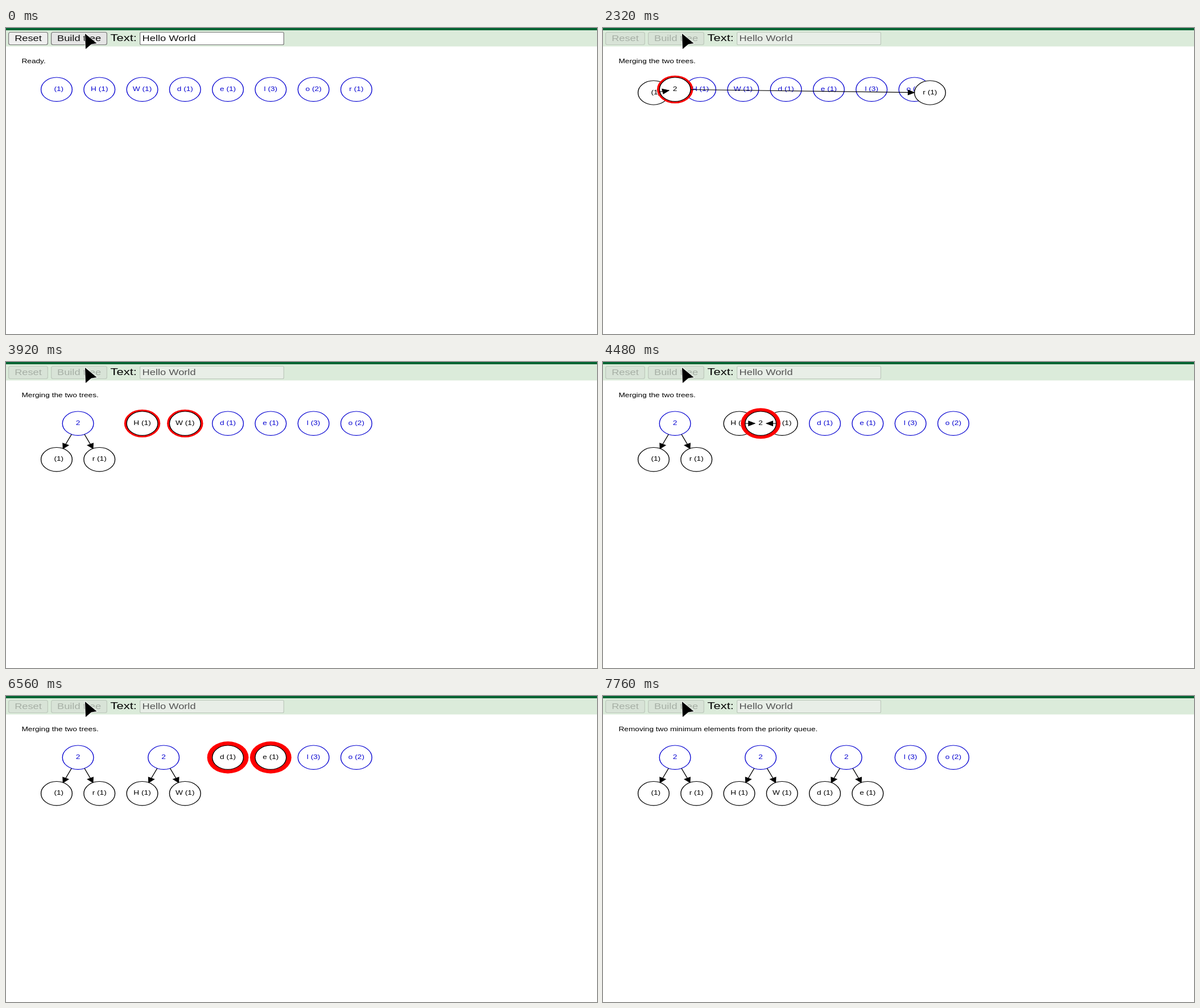
These frames come from a looping animation (1039 px wide and 539 px high, 8000 ms). An HTML page with a canvas:

```html
<!DOCTYPE html>
<html lang="en">
<head>
<meta charset="utf-8">
<title>Building a Huffman tree</title>
<style>
  html, body { margin: 0; width: 100%; height: 100%; overflow: hidden; background: #fff; }
  canvas { display: block; }
</style>
</head>
<body>
<canvas id="stage" width="1039" height="539"></canvas>
<script>
const ctx = document.getElementById("stage").getContext("2d");
const LOOP = 8000;
const SX = 1.3687, SY = 1.058;          // the whole page is shown wider than tall
const FONT = '"Liberation Sans", Arial, sans-serif';
const BLUE = "#0b08d2", BLACK = "#000", RED = "#f00";
const RADIUS = 20, SLOT = 55, FIRST_X = 65, ROOT_Y = 102.3, LEVEL = 60;

const labels = ["  (1)", "H (1)", "W (1)", "d (1)", "e (1)", "l (3)", "o (2)", "r (1)"];
const pairs = [[0, 7], [1, 2], [3, 4]];

// Each merge cycle runs through the same stages, in ms after its start.
const DISABLED_AT = 800;
const starts = [1175, 3358, 5515, 7690];
const MERGE = 363, MOVE = 1095, REINSERT = 1458, TICK = 33, TICKS = 11;

const clamp = (v, lo, hi) => Math.max(lo, Math.min(hi, v));
const mix = (a, b, p) => a + (b - a) * p;
const slotX = slot => FIRST_X + SLOT * slot;

function moveProgress(age) {
  return clamp(Math.floor((age - MOVE) / TICK) / TICKS, 0, 1);
}

// Highlight rings swell and shrink between 3 and 7 units.
function ringWidth(t) {
  const phase = ((t - 2280) / 1680 % 1 + 1) % 1;
  return 3 + 4 * (1 - Math.abs(1 - 2 * phase));
}

function message(t) {
  const age = t - (starts.filter(s => s <= t).pop() ?? Infinity);
  if (age < 0) return "Ready.";
  if (age < MERGE) return "Removing two minimum elements from the priority queue.";
  if (age < REINSERT) return "Merging the two trees.";
  return "Reinserting the new root node in the priority queue.";
}

function write(str, x, y, size, color, align = "left", baseline = "alphabetic") {
  ctx.font = `${size}px ${FONT}`;
  ctx.fillStyle = color;
  ctx.textAlign = align;
  ctx.textBaseline = baseline;
  ctx.fillText(str, x, y);
}

// Places text by stage pixels.
function writeAt(str, px, py, size, color, align) {
  write(str, px / SX, py / SY, size, color, align);
}

function box(x, y, w, h, fill, stroke, radius = 3) {
  ctx.beginPath();
  ctx.roundRect(x + 0.6, y + 0.5, w - 1.2, h - 1, radius);
  ctx.fillStyle = fill;
  ctx.fill();
  ctx.strokeStyle = stroke;
  ctx.lineWidth = 1.2;
  ctx.stroke();
}

function disc(x, y, r) {
  ctx.beginPath();
  ctx.arc(x, y, r, 0, 2 * Math.PI);
}

function drawNode(node, ring) {
  if (node.lit) {
    disc(node.x, node.y, RADIUS + ring);
    ctx.fillStyle = RED;
    ctx.fill();
  }
  disc(node.x, node.y, RADIUS);
  ctx.fillStyle = "#fff";
  ctx.fill();
  ctx.strokeStyle = node.color;
  ctx.lineWidth = 1;
  ctx.stroke();
  write(node.label, node.x, node.y - 0.3, 10, node.color, "center", "middle");
}

function drawEdge(from, to) {
  const dx = to.x - from.x, dy = to.y - from.y, len = Math.hypot(dx, dy);
  const ux = dx / len * RADIUS, uy = dy / len * RADIUS;
  const x1 = from.x + ux, y1 = from.y + uy, x2 = to.x - ux, y2 = to.y - uy;
  ctx.strokeStyle = ctx.fillStyle = BLACK;
  ctx.lineWidth = 1;
  ctx.beginPath();
  ctx.moveTo(x1, y1);
  ctx.lineTo(x2, y2);
  ctx.stroke();
  ctx.save();
  ctx.translate(x2, y2);
  ctx.rotate(Math.atan2(y2 - y1, x2 - x1));
  ctx.beginPath();
  ctx.moveTo(0, 0);
  ctx.lineTo(-8, -4);
  ctx.lineTo(-8, 4);
  ctx.closePath();
  ctx.fill();
  ctx.stroke();
  ctx.restore();
}

function drawTree(t) {
  const shift = moveProgress(t - starts[0]);
  const nodes = labels.map((label, i) => {
    const target = i === 0 ? 0 : i === 7 ? 1 : i + 1;
    return { label, x: slotX(mix(i, target, shift)), y: ROOT_Y, color: BLUE };
  });
  const parents = [], edges = [];
  pairs.forEach((pair, k) => {
    const age = t - starts[k];
    if (age < MERGE) return;
    const children = pair.map(i => nodes[i]);
    for (const child of children) {
      child.color = BLACK;
      child.lit = age < MOVE;
      child.y += LEVEL * moveProgress(age);
    }
    if (age < MOVE) return;
    const merging = age < REINSERT;
    const parent = { label: "2", x: slotX(2 * k + 0.5), y: ROOT_Y,
                     color: merging ? BLACK : BLUE, lit: merging };
    parents.push(parent);
    for (const child of children) edges.push([parent, child]);
  });
  const all = [...nodes, ...parents], ring = ringWidth(t);
  all.filter(n => !n.lit).forEach(n => drawNode(n, ring));
  all.filter(n => n.lit).forEach(n => drawNode(n, ring));
  edges.forEach(([from, to]) => drawEdge(from, to));
}

function drawBar(disabled) {
  ctx.fillStyle = "#dbebda";
  ctx.fillRect(0, 0, 1039, 32.5);
  ctx.fillStyle = "#006432";
  ctx.fillRect(0, 0, 1039, 4);
  const border = disabled ? "#bdc9bc" : "#767676";
  box(4, 7, 70, 23, disabled ? "#d8e3d7" : "#efefef", border);
  box(79, 7, 99, 23, disabled ? "#d8e3d7" : "#e5e5e5", border);
  box(235, 7, 254, 23, disabled ? "#e8eee7" : "#fff", border, 2);
}

function drawBarText(disabled) {
  const ink = disabled ? "#a6afa5" : "#111";
  writeAt("Reset", 39, 23.2, 13.333, ink, "center");
  writeAt("Build tree", 128.5, 23.2, 13.333, ink, "center");
  writeAt("Text:", 183.6, 23.2, 16, BLACK);
  writeAt("Hello World", 239.6, 23.2, 13.333, disabled ? "#545454" : "#111");
}

function drawCursor() {
  ctx.beginPath();
  ctx.moveTo(139, 10);
  ctx.lineTo(159.5, 27);
  ctx.lineTo(150, 28.5);
  ctx.lineTo(140, 37);
  ctx.closePath();
  ctx.lineJoin = "round";
  ctx.strokeStyle = "rgba(255,255,255,0.6)";
  ctx.lineWidth = 2.5;
  ctx.stroke();
  ctx.fillStyle = BLACK;
  ctx.fill();
  ctx.lineJoin = "miter";
}

function draw(t) {
  const disabled = t >= DISABLED_AT;
  ctx.setTransform(1, 0, 0, 1, 0, 0);
  ctx.fillStyle = "#fff";
  ctx.fillRect(0, 0, 1039, 539);
  drawBar(disabled);
  ctx.scale(SX, SY);
  drawBarText(disabled);
  writeAt(message(t), 27.4, 62, 10, BLACK);
  drawTree(t);
  ctx.setTransform(1, 0, 0, 1, 0, 0);
  drawCursor();
}

const begin = performance.now();
function frame() {
  draw((performance.now() - begin) % LOOP);
  requestAnimationFrame(frame);
}
frame();
</script>
</body>
</html>
```
